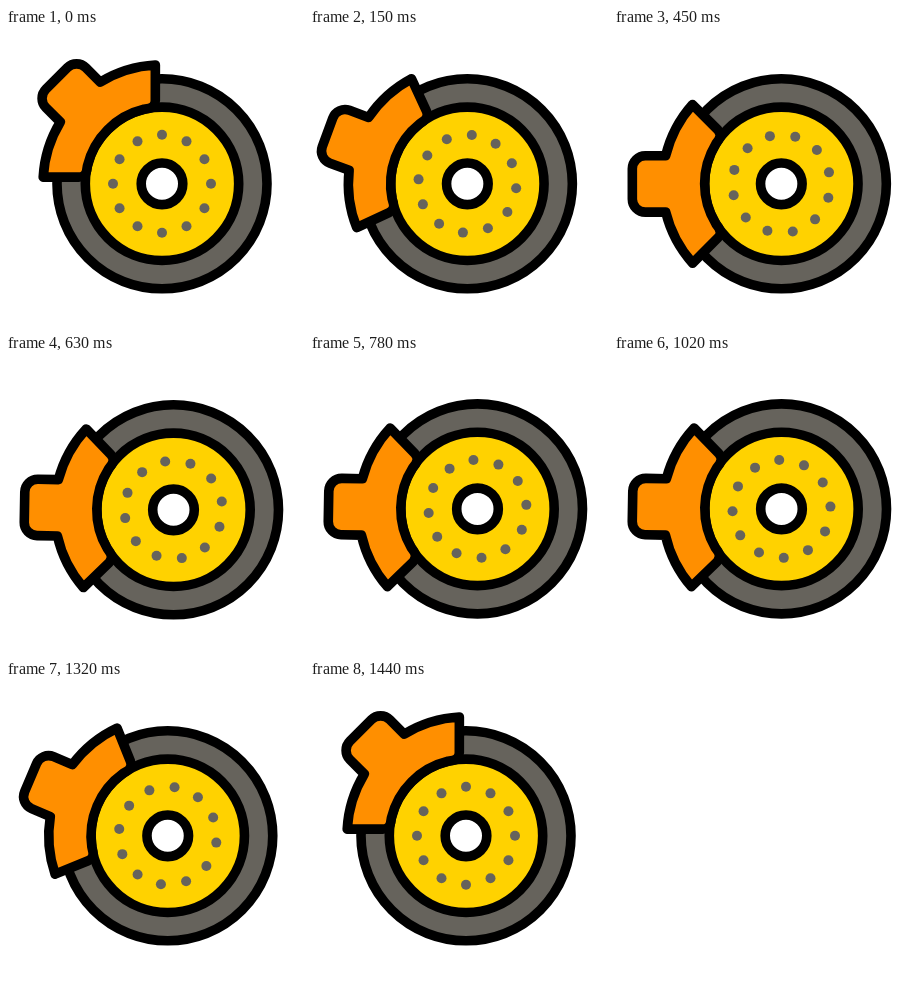
An HTML page with a canvas for the animation above (1.5 s loop, 298 by 298 pixels).

```html
<!DOCTYPE html>
<html lang="en">
<head>
<meta charset="utf-8">
<title>Brake disc</title>
<style>
  html, body { margin: 0; width: 100%; height: 100%; overflow: hidden; background: #fff; }
  canvas { display: block; width: 298px; height: 298px; }
</style>
</head>
<body>
<canvas id="stage" width="298" height="298"></canvas>
<script>
const ctx = document.getElementById('stage').getContext('2d');
const LOOP = 1500, STEP = 30, LINE = 9.6;
const GRAY = '#66635c', YELLOW = '#ffd200', ORANGE = '#ff8f00';
const RING = 76.7;
const rad = deg => deg * Math.PI / 180;
const polar = (r, a) => [r * Math.cos(a), r * Math.sin(a)];

// Smooth ease from 0 to 1 between two times.
function ease(t, from, to) {
  const p = Math.min(1, Math.max(0, (t - from) / (to - from)));
  return p * p * (3 - 2 * p);
}

function pose(t) {
  const back = ease(t, 1200, 1440);
  const shaking = t > 450 && t < 1170;
  return {
    x: 156 + 11.5 * (ease(t, 60, 480) - back),
    y: 155.8 - (shaking ? 0.9 * Math.sin((t - 630) / 120 * 2 * Math.PI) : 0),
    turn: rad(-63 * ease(t, 60, 270) + 19 * ease(t, 270, 480) + 44 * back),
    spin: rad(360 * ease(t, 420, 1200))
  };
}

function circle(x, y, r, fill, outlined) {
  ctx.beginPath();
  ctx.arc(x, y, r, 0, 2 * Math.PI);
  ctx.fillStyle = fill;
  ctx.fill();
  if (outlined) ctx.stroke();
}

function drawDisc(angle) {
  circle(0, 0, 105, GRAY, true);
  circle(0, 0, RING, YELLOW, true);
  circle(0, 0, 20.8, '#fff', true);
  for (let i = 0; i < 12; i++) {
    circle(...polar(49, angle + rad(30 * i)), 5, GRAY, false);
  }
}

// The caliper points left, symmetric about the horizontal axis.
function drawCaliper() {
  const outer = 119, tip = -149, half = 28.2, round = 13, corner = 8;
  const end = rad(41.8), innerEnd = rad(40), bend = innerEnd - 0.15;
  const neck = Math.asin(half / outer), neckX = -outer * Math.cos(neck);
  ctx.beginPath();
  ctx.arc(0, 0, outer, Math.PI + end, Math.PI + neck, true);
  ctx.arcTo(tip, -half, tip, 0, round);
  ctx.arcTo(tip, half, neckX, half, round);
  ctx.arc(0, 0, outer, Math.PI - neck, Math.PI - end, true);
  ctx.arcTo(...polar(RING, Math.PI - innerEnd), ...polar(RING, Math.PI - bend), corner);
  ctx.arc(0, 0, RING, Math.PI - bend, Math.PI + bend);
  ctx.arcTo(...polar(RING, Math.PI + innerEnd), ...polar(outer, Math.PI + end), corner);
  ctx.closePath();
  ctx.fillStyle = ORANGE;
  ctx.fill();
  ctx.stroke();
}

function draw(now) {
  const t = Math.floor((now % LOOP) / STEP) * STEP;
  const { x, y, turn, spin } = pose(t);
  ctx.fillStyle = '#fff';
  ctx.fillRect(0, 0, 298, 298);
  ctx.save();
  ctx.translate(x, y);
  ctx.lineWidth = LINE;
  ctx.lineJoin = 'round';
  ctx.strokeStyle = '#000';
  drawDisc(turn + spin);
  ctx.rotate(turn + rad(45));
  drawCaliper();
  ctx.restore();
}

const start = performance.now();
function tick() {
  draw(performance.now() - start);
  requestAnimationFrame(tick);
}
tick();
</script>
</body>
</html>
```
